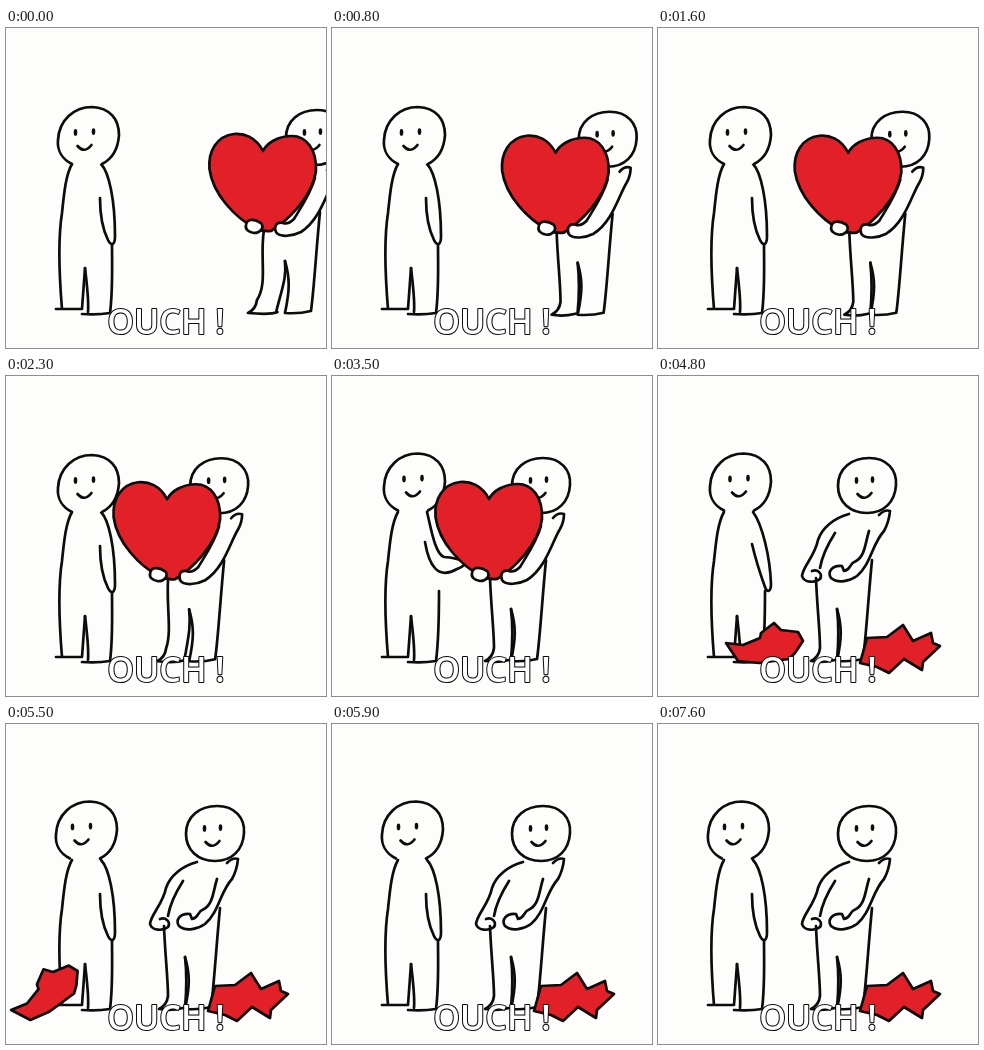
These frames come from a looping animation (320 px wide and 320 px high, 7700 ms). An HTML page with a canvas:

```html
<!DOCTYPE html>
<html lang="en">
<head>
<meta charset="utf-8">
<title>Ouch</title>
<style>
  html, body { margin: 0; width: 100%; height: 100%; overflow: hidden; background: #fdfefc; }
  canvas { display: block; width: 320px; height: 320px; }
</style>
</head>
<body>
<canvas width="320" height="320"></canvas>
<script>
const ctx = document.querySelector('canvas').getContext('2d');
const LOOP = 7700, PAPER = '#fdfefc', INK = '#0c0c0c', RED = '#e12027';
const WALK_END = 2400, BREAK = 3800;

const clamp = v => Math.min(1, Math.max(0, v));
const lerp = (a, b, k) => a + (b - a) * k;
const span = (t, from, to) => clamp((t - from) / (to - from));
const smooth = k => k * k * (3 - 2 * k);

function draw(path, fill) {
  const shape = new Path2D(path);
  if (fill) {
    ctx.fillStyle = fill;
    ctx.fill(shape);
  }
  ctx.stroke(shape);
}

function face(x, y, gap) {
  ctx.fillStyle = INK;
  for (const side of [-1, 1]) {
    ctx.beginPath();
    ctx.ellipse(x + side * gap / 2, y - side * 0.4, 1.8, 3.4, 0, 0, 7);
    ctx.fill();
  }
  draw(`M${x - 7} ${y + 14} Q${x} ${y + 22} ${x + 7} ${y + 13}`);
}

// Arm poses: start, then three Bezier segments (outer side, hand, inner side).
const ARM = {
  rest: [95, 136, 103, 144, 109, 172, 109, 208, 109, 218, 105, 218, 102, 212, 97, 202, 94, 190, 94, 170],
  reach: [95, 136, 99, 152, 103, 178, 112, 181, 126, 182, 142, 187, 125, 193, 106, 204, 97, 190, 93, 166],
  loose: [95, 136, 104, 148, 112, 180, 113, 208, 113, 216, 109, 217, 107, 211, 103, 200, 98, 185, 94, 168]
};

function leftArm(t) {
  const blend = (a, b, k) => a.map((v, i) => lerp(v, b[i], smooth(k)));
  let p = blend(ARM.rest, ARM.reach, span(t, 2500, 3100));
  p = blend(p, ARM.loose, span(t, BREAK, 4200));
  p = blend(p, ARM.rest, span(t, 4900, 5300));
  return `M${p.slice(0, 2)} C${p.slice(2, 8)} C${p.slice(8, 14)} C${p.slice(14)}`;
}

function leftPerson(t) {
  const turn = smooth(span(t, 2500, 2900)), turnBack = smooth(span(t, 4900, 5200));
  const hip = 106 + smooth(span(t, 2500, 3100)) - smooth(span(t, 4900, 5300));
  draw('M66 136 C60 146 58 165 56 185 C52 210 53 245 56 281 M50 281 L76 281 C77 268 78 255 79 240');
  draw(`M79 240 C81 258 83 272 82 284 M76 286 Q92 287 104 285 C107 262 ${hip} 240 ${hip} 215`);
  draw(leftArm(t), PAPER);
  ctx.save();
  ctx.translate(-2 * turnBack, -1.5 * turn);
  draw('M66 136 C56 131 51 122 52 112 C53 92 68 79 86 79 C104 80 113 91 113 107 C112 122 106 131 96 136', PAPER);
  face(78.5 + 2.5 * turn - 3.5 * turnBack, 104, 18);
  ctx.restore();
}

function rightBody(swing) {
  const step = -11 * swing;
  draw(`M158 202 C${159 + step / 2} 230 162 255 ${162 + step} 272 Q${161 + step} 281 ${153 + step} 285 Q165 287 ${177 + step / 2} 284`);
  draw(`M179 233 C181 250 ${181 + step / 2} 262 ${179 + step * 0.8} 284`);
  draw('M179 233 C184 250 184 262 179 285 Q193 286 205 283 C208 262 210 225 214 184');
  draw('M180 110 C180 92 194 82 211 82 C229 82 239 94 238 109 C237 126 226 137 209 137 C192 137 180 126 180 110Z', PAPER);
  face(206.5, 104, 16);
}

const HEART = 'M157 123 C150 109 138 105 128 106 C111 108 102 123 103.5 141 C107 167 130 190 149 200 Q157 204 165 203 ' +
  'C180 194 207 169 210 143 C211 121 200 108 186 108 C172 108 161 115 157 123Z';

function holdingArms() {
  draw('M140 197 C141 190 149 191 155 195 C159 200 154 205 148 205 C142 204 139 201 140 197Z', PAPER);
  draw('M209 150 C205 165 196 178 188 191 Q182 197 177 195 C170 193 168 199 170 204 C174 210 187 208 195 204 ' +
    'C214 192 220 166 228 153 Q232 146 232 138 Q226 136 221 142', PAPER);
}

function emptyArms() {
  draw('M191 138 C176 142 164 152 160 164 C157 180 145 190 144 200 C146 207 157 207 162 203 C165 198 160 193 154 195 ' +
    'M162 192 C164 180 170 168 177 157');
  draw('M211 155 C207 168 207 180 198 185 C190 188 194 193 186 195 L184 190 C174 189 169 196 173 202 ' +
    'C180 208 192 205 199 200 C213 188 214 168 226 155 Q231 146 232 135 Q227 133 221 139');
}

const SHARDS = {
  left: 'M68 267 L85 269 L102 262 L103 257 L116 247 L123 254 L140 256 L145 265 L137 277 L131 283 L101 287 L80 285Z',
  right: 'M202 287 L209 262 L229 261 L245 249 L255 265 L273 257 L275 267 L282 270 L265 286 L264 294 L246 283 L231 297 L219 291Z'
};

function shard(path, cx, cy, dx, dy, angle) {
  ctx.save();
  ctx.translate(cx + dx, cy + dy);
  ctx.rotate(angle);
  ctx.translate(-cx, -cy);
  draw(path, RED);
  ctx.restore();
}

function shards(t) {
  const fall = span(t, BREAK, 4300), up = 1 - fall * fall;
  const settle = 1 - smooth(span(t, 4300, 4700));
  if (t < 5850) {
    const kick = span(t, 4950, 5800) ** 2;
    shard(SHARDS.left, 107, 268, 26 * up - 160 * kick, -112 * up, up - 1.2 * kick);
  }
  const drift = lerp(-60, 36, fall) * settle;
  shard(SHARDS.right, 242, 271, drift, -118 * up, -1.1 * up);
}

function caption() {
  ctx.font = '600 34px "Open Sans", sans-serif';
  ctx.textAlign = 'center';
  ctx.lineWidth = 2;
  ctx.strokeText('OUCH !', 160, 306);
  ctx.fillStyle = '#fff';
  ctx.fillText('OUCH !', 160, 306);
}

function frame(now) {
  const t = now % LOOP;
  const walk = span(t, 0, WALK_END);
  const swing = t < WALK_END ? Math.max(0, Math.cos(t / 1066 * 2 * Math.PI)) : 0;

  ctx.fillStyle = PAPER;
  ctx.fillRect(0, 0, 320, 320);
  ctx.strokeStyle = INK;
  ctx.lineWidth = 2.7;
  ctx.lineCap = ctx.lineJoin = 'round';

  leftPerson(t);

  ctx.save();
  ctx.translate(100 * (1 - walk), 2 * Math.sin(walk * Math.PI));
  rightBody(swing);
  if (t < BREAK) {
    draw(HEART, RED);
    holdingArms();
  } else {
    emptyArms();
  }
  ctx.restore();

  if (t >= BREAK) shards(t);
  caption();
  requestAnimationFrame(frame);
}

requestAnimationFrame(frame);
</script>
</body>
</html>
```
